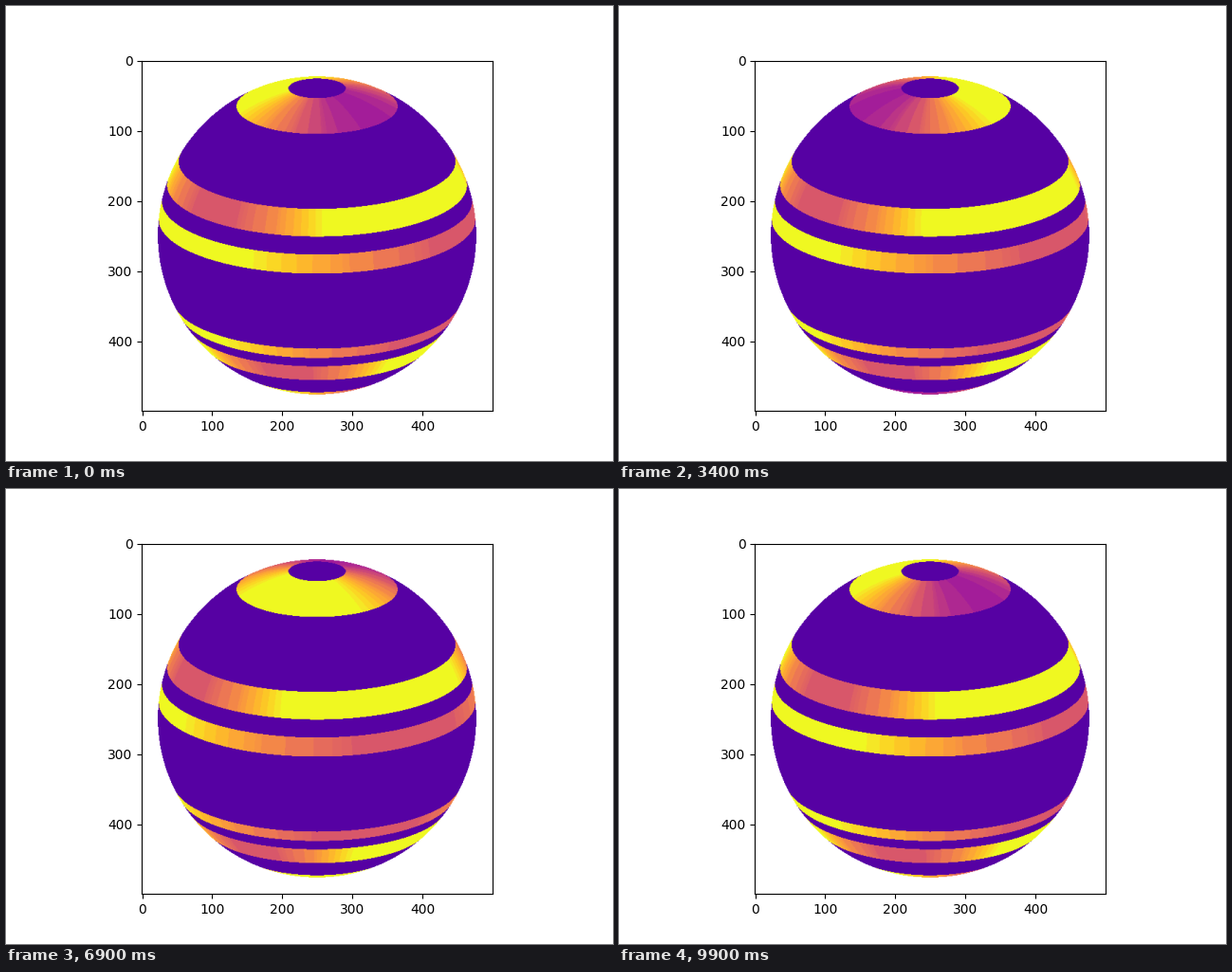
A matplotlib script for the animation above (10000 ms loop, 640 px wide and 480 px high).

```python
import numpy as np
import matplotlib.pyplot as plt
from matplotlib.animation import FuncAnimation
from matplotlib.colors import ListedColormap

SIZE = 500
FRAMES = 100
TILT = np.radians(20)
BASE = 0.15
AMP = 0.4
LAT_SHIFT = 0.4


def stepped_plasma():
    """Plasma reduced to a few flat colours, 8 x 16 x 8 levels of RGB."""
    rgb = plt.get_cmap("plasma")(np.arange(256))[:, :3]
    cells = np.floor(rgb * 255 / [32, 16, 32]).astype(int)
    keys = cells @ [256, 16, 1]
    out = rgb.copy()
    for key in np.unique(keys):
        out[keys == key] = rgb[keys == key].mean(axis=0)
    for level in (int(BASE * 256), 255):
        out[keys == keys[level]] = rgb[level]
    cmap = ListedColormap(out)
    cmap.set_bad("white")
    return cmap


def sphere_coords():
    """Latitude and longitude in degrees seen at each pixel, NaN off the disc."""
    axis = np.linspace(-1.1, 1.1, SIZE)
    x, y = np.meshgrid(axis, -axis)
    r2 = x**2 + y**2
    z = np.sqrt(np.where(r2 <= 1, 1 - r2, np.nan))
    up = y * np.cos(TILT) + z * np.sin(TILT)
    front = z * np.cos(TILT) - y * np.sin(TILT)
    lat = np.degrees(np.arcsin(np.clip(up, -1, 1)))
    return lat + LAT_SHIFT, np.degrees(np.arctan2(x, front))


lat, lon = sphere_coords()


def band(centre, half, trough, waves=1):
    """A belt of latitude with a travelling wave; polar belts are dimmer and slower."""
    mask = np.abs(lat - centre) <= half
    polar = abs(centre) > 60
    mean, cycles = (0.75, 1) if polar else (0.95, 3)
    phase = np.radians(waves * (lon[mask] - trough))
    return mask, mean, phase, cycles


bands = [
    band(70, 10, 50),
    band(25, 5, -45, waves=2),
    band(10, 3.5, 70),
    band(-27.5, 2.5, 55),
    band(-40, 5, -14, waves=2),
    band(-70, 10, 100),
]


def planet(i):
    img = np.where(np.isnan(lat), np.nan, BASE)
    turn = 2 * np.pi * i / (FRAMES - 1)
    for mask, mean, phase, cycles in bands:
        img[mask] = mean - AMP * np.cos(phase + cycles * turn)
    return np.ma.masked_invalid(img)


fig, ax = plt.subplots(figsize=(6.4, 4.8), dpi=100)
image = ax.imshow(planet(0), cmap=stepped_plasma(), vmin=0, vmax=1,
                  interpolation="hanning", interpolation_stage="rgba")


def update(i):
    image.set_data(planet(i))
    return [image]


anim = FuncAnimation(fig, update, frames=FRAMES, interval=100, repeat=True)
plt.show()
```
